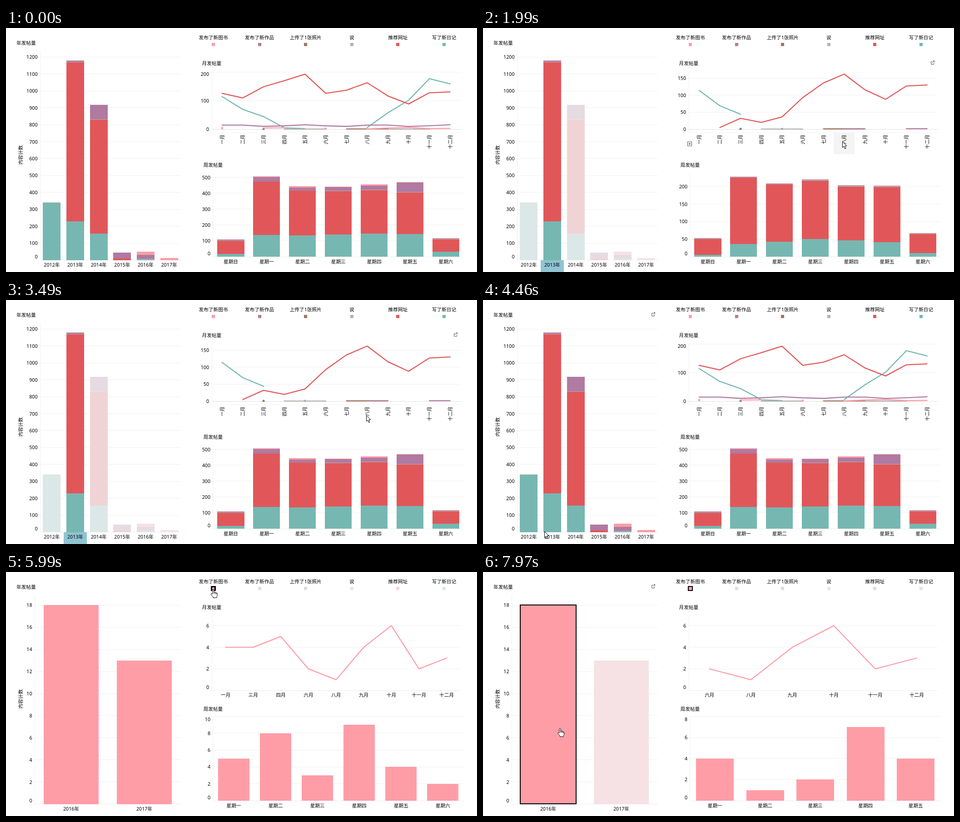
An HTML page for the animation above (8 s loop, 1037 px wide and 540 px high).

```html
<!DOCTYPE html>
<html lang="zh">
<head>
<meta charset="utf-8">
<style>
html, body { margin: 0; width: 100%; height: 100%; overflow: hidden; background: #fff; }
svg { display: block; font: 10.67px "Noto Sans", "Noto Sans CJK SC", "Noto Sans CJK", sans-serif; }
</style>
</head>
<body>
<svg id="stage" width="1037" height="540" viewBox="0 0 1037 540"></svg>
<script>
const stage = document.getElementById('stage');
const LOOP = 8000, PACE = 498, LEAD = 22;

// Series order: diary, link, said, photo, work, book
const COLORS = ['#76b7b2', '#e15759', '#bab0ac', '#9c755f', '#b07aa1', '#ff9da7'];
const BOOK = 5, AUGUST = 7;
const LEGEND = ['发布了新图书', '发布了新作品', '上传了1张照片', '说', '推荐网址', '写了新日记'];
const MONTHS = ['一', '二', '三', '四', '五', '六', '七', '八', '九', '十', '十一', '十二'].map(m => m + '月');
const DAYS = [...'日一二三四五六'].map(d => '星期' + d);

const mix = (diary = 0, link = 0, work = 0, book = 0) => [diary, link, diary ? 2 : 0, 0, work, book];
const bookOnly = n => mix(0, 0, 0, n);
const yearNames = (from, to) => Array.from({ length: to - from + 1 }, (_, i) => from + i + '年');

// Posts per year
const yearBase = { x0: 75, x1: 385, y0: 513.5, top: 50, labelY: 524, tickX: 69.5 };
const yearAll = {
  ...yearBase, k: 0.3742, step: 100, max: 1200, labels: yearNames(2012, 2017),
  data: [mix(338), mix(228, 942, 8), mix(157, 674, 84), mix(0, 9, 36), mix(5, 0, 25, 18), bookOnly(13)]
};
const yearBook = {
  ...yearBase, x0: 63, tickX: 57.5, k: 24.45, step: 2, max: 18,
  labels: yearNames(2016, 2017), data: [18, 13].map(bookOnly)
};
const YEARS = {
  all: yearAll, y13: { ...yearAll, sel: 1, mark: true },
  book: yearBook, book16: { ...yearBook, sel: 0 }
};

// Posts per weekday: totals, with the diary share rising towards midweek
const posts = [108, 507, 445, 441, 455, 470, 116];
const posts13 = [53, 228, 209, 220, 203, 202, 67];
const workDays = [5, 28, 20, 22, 24, 60, 3];
const bookDays = [0, 5, 8, 3, 9, 4, 2];
const midweek = i => Math.sin(Math.PI * i / 7);
function weekday(total, share, work, book = 0) {
  const diary = total * share;
  return mix(diary, total - diary - work - book - 2, work, book);
}
const weekBase = { x0: 455.5, x1: 1008, y0: 506, top: 319.5, labelY: 517, tickX: 450, labels: DAYS };
const WEEKS = {
  all: {
    ...weekBase, k: 0.351, step: 100, max: 500,
    data: posts.map((n, i) => weekday(n, 0.17 + 0.15 * Math.sqrt(midweek(i)), workDays[i], bookDays[i]))
  },
  y13: {
    ...weekBase, k: 0.776, step: 50, max: 200,
    data: posts13.map((n, i) => weekday(n, 0.1 + 0.13 * midweek(i), 1))
  },
  aug: { ...weekBase, k: 5.6, step: 10, max: 30, data: posts13.map(n => mix(0, n * 0.13)) },
  book: {
    ...weekBase, k: 18.66, step: 2, max: 10,
    labels: DAYS.slice(1), data: bookDays.slice(1).map(bookOnly)
  },
  book16: {
    ...weekBase, k: 23.32, step: 2, max: 8,
    labels: DAYS.slice(1, 6), data: [4, 1, 2, 7, 4].map(bookOnly)
  }
};

// Posts per month; empty places break the line
const flat = (v, ...spans) => MONTHS.map((_, i) => spans.some(([a, b]) => i >= a && i <= b) ? v : undefined);
const diary = [114, 69, 44, 5, 2, , , 6, 57, 101, 176, 158];
const link = [125, 109, 148, 169, 192, 125, 136, 162, 116, 88, 127, 130];
const work = MONTHS.map((_, i) => 12.5 + 3 * Math.cos(1.8 * (i - 4)));
const book = [4, , 4, 5, , 2, , 1, 4, 6, 2, 3];
const photo = flat(1, [2, 2], [6, 8]);

const monthBase = { x0: 453, x1: 1000.5, y0: 224, top: 95, bottom: 231.5, labels: MONTHS, tall: true };
const month13 = {
  ...monthBase, k: 0.753, step: 50, max: 150,
  data: [
    [...diary.slice(0, 3), , 1],
    [, 5, 32, 20, 36, 93, ...link.slice(6)],
    flat(0.4, [3, 5]), photo, flat(1.5, [7, 8], [10, 11]), []
  ]
};
function bookMonths(from) {
  const used = MONTHS.map((_, i) => i).filter(i => i >= from && book[i]);
  return {
    ...monthBase, y0: 262.3, bottom: 262.5, tall: false, k: 23.93, step: 2, max: 6,
    labels: used.map(i => MONTHS[i]), data: [[], [], [], [], [], used.map(i => book[i])]
  };
}
const MONTHLY = {
  all: {
    ...monthBase, k: 0.635, step: 100, max: 200,
    data: [diary, link, flat(0.4, [3, 5], [8, 10]), photo, work, book]
  },
  y13: month13, aug: { ...month13, sel: AUGUST },
  book: bookMonths(0), book16: bookMonths(5)
};

// Evenly paced steps; each changes only the listed fields.
const view = name => ({ year: name, month: name, week: name });
const arrow = (x, y) => ({ cursor: ['arrow', x, y] });
const hand = (x, y) => ({ cursor: ['hand', x, y] });
const STEPS = [
  { ...view('all'), swatch: 0, outline: 0 },
  { ...view('y13'), ...arrow(140, 521), icon: 'year', plus: 'year' },
  { ...arrow(812, 254), icon: null, plus: 'month', hover: true },
  { ...arrow(785, 260), icon: 'month' },
  arrow(791, 251),
  { ...arrow(782, 251), month: 'aug', week: 'aug' },
  arrow(793, 255),
  { month: 'y13', week: 'all', plus: null, hover: false },
  { ...arrow(135, 516), icon: 'year', plus: 'year' },
  { ...view('all'), ...arrow(135, 512), plus: null },
  { ...arrow(438, 36), icon: null, swatch: 1 },
  hand(456, 38.5),
  { ...view('book'), swatch: 3 },
  { ...arrow(413, 84), swatch: 2 },
  arrow(469, 278),
  { ...hand(192, 328.5), icon: 'year', outline: 1 },
  { ...view('book16'), ...hand(169.5, 346), outline: 2 }
];

function fade(hex) {
  const part = i => Math.round(parseInt(hex.substr(i, 2), 16) * 0.2 + 195);
  return `rgb(${part(1)},${part(3)},${part(5)})`;
}
const rect = (x, y, w, h, fill, extra = '') =>
  `<rect x="${x}" y="${y}" width="${w}" height="${h}" fill="${fill}" ${extra}/>`;
const framed = (x, y, w, h, fill, stroke) =>
  rect(x, y, w, h, fill, `stroke="#000" stroke-width="${stroke}"`);
const path = (d, stroke, width, extra = 'fill="none"') =>
  `<path d="${d}" stroke="${stroke}" stroke-width="${width}" ${extra}/>`;
const text = (s, x, y, anchor = 'middle', extra = '') =>
  `<text x="${x}" y="${y + 4}" text-anchor="${anchor}" ${extra}>${s}</text>`;
const upright = (s, x, y, anchor) =>
  text(s, 0, 0, anchor, `transform="translate(${x} ${y}) rotate(-90)"`);
const crisp = y => Math.floor(y) + 0.5;

function axis(c, tickX, bottom) {
  let out = path(`M${crisp(c.x0)} ${c.top}V${bottom}`, '#f0f0f0', 1);
  for (let v = 0; v <= c.max; v += c.step) {
    const y = c.y0 - v * c.k;
    const labelY = Math.min(bottom - 7.3, Math.max(c.top + 6.7, y));
    out += path(`M${c.x0} ${crisp(y)}H${c.x1}`, v ? '#f1f1f1' : '#ebebeb', 1);
    out += text(v, tickX, labelY, 'end');
  }
  return out;
}

function barChart(c, outline) {
  const pitch = (c.x1 - c.x0) / c.labels.length;
  const py = v => Math.round(c.y0 - v * c.k);
  let out = axis(c, c.tickX, c.y0);
  c.data.forEach((stack, i) => {
    const mid = c.x0 + pitch * (i + 0.5);
    const left = Math.round(mid - pitch * 0.375), right = Math.round(mid + pitch * 0.375);
    const dim = c.sel !== undefined && c.sel !== i;
    let sum = 0;
    stack.forEach((v, s) => {
      const low = py(sum), high = py(sum += v);
      if (low > high) out += rect(left, high, right - left, low - high, dim ? fade(COLORS[s]) : COLORS[s]);
    });
    if (c.mark && !dim) out += rect(Math.round(mid - pitch / 2), 514, Math.floor(pitch), 26, '#8fc4d3');
    out += text(c.labels[i], mid, c.labelY);
    if (outline && i === 0) {
      const half = outline / 2, top = py(sum) - 1 + half;
      out += framed(left - half, top, right - left + outline, py(0) - half - top, 'none', outline);
    }
  });
  return out;
}

function lineChart(c, hover) {
  const pitch = (c.x1 - c.x0) / c.labels.length;
  const px = i => c.x0 + pitch * (i + 0.5);
  const picked = c.sel !== undefined;
  let out = '';
  if (hover) out += rect(px(AUGUST) - pitch / 2, 232, pitch, 47, picked ? '#8fc4d3' : '#f4f4f4');
  out += axis(c, 447, c.bottom);
  if (c.tall) {
    out += path(`M${c.x0} 224.5H${c.x1}`, '#c8c8c8', 1, 'stroke-dasharray="1 2"');
    out += path(`M${c.x0} 231.5H${c.x1}`, '#f3f3f3', 1);
  }
  c.data.forEach((row, s) => {
    const color = picked ? fade(COLORS[s]) : COLORS[s];
    const has = i => row[i] !== undefined;
    const point = i => `${px(i)} ${c.y0 - row[i] * c.k}`;
    const dot = (i, fill) => path(`M${point(i)}h0`, fill, 5, 'stroke-linecap="round"');
    let d = '';
    c.labels.forEach((_, i) => {
      if (!has(i)) return;
      if (has(i - 1)) d += 'L' + point(i);
      else if (has(i + 1)) d += 'M' + point(i);
      else out += dot(i, color);
    });
    if (d) out += path(d, color, 2.3, 'fill="none" stroke-linejoin="round" stroke-linecap="round"');
    if (picked && has(c.sel)) out += dot(c.sel, COLORS[s]);
  });
  c.labels.forEach((m, i) => {
    out += c.tall ? upright(m, px(i), 236, 'end') : text(m, px(i), 272);
  });
  return out;
}

function legend(swatch) {
  return LEGEND.map((name, i) => {
    const x = 456.5 + i * 101.6;
    const color = COLORS[BOOK - i];
    let out = text(name, x, 21);
    out += rect(Math.round(x - 3.6), 33, 7, 7, swatch > 1 && i ? fade(color) : color);
    if (swatch && !i) {
      const size = (swatch > 1 ? 11 : 7) - swatch;
      out += framed(x - size / 2, 36.5 - size / 2, size, size, color, swatch);
    }
    return out;
  }).join('');
}

const at = (x, y, body) => `<g transform="translate(${x} ${y})">${body}</g>`;
const openIcon = path('M3.5 2H.7V8.4H6.7V5.4M4.6.6H7.5V3.6M7.3.8L3 5.1', '#555', 1);
const plusIcon = rect(.5, .5, 9, 9, '#fff', 'stroke="#555"') + path('M2.5 5H7.5M5 2.5V7.5', '#444', 1);
const CURSORS = {
  arrow: 'M.5.5V13.6L3.5 10.8 5.7 16.2 8 15.2 5.8 10H9.9Z',
  hand: 'M-1.5 10V1.5a1.5 1.5 0 0 1 3 0V7q0-1.3 1.4-1.3t1.4 1.3v.6q0-1 1.3-1t1.3 1.2v.8q0-.9 1.1-.9t1.1 1.3V13q0 2-1.4 3.5V18.5H0V16.5L-4.5 11.5q-.8-1.2.3-2t2.7 1ZM1.5 7v3M4.3 7.6v2.6M6.9 8.6v2'
};

function draw(s) {
  let out = legend(s.swatch);
  out += text('年发帖量', 23, 33, 'start') + text('月发帖量', 431.5, 78, 'start') + text('周发帖量', 434.5, 303, 'start');
  out += upright('内容计数', 32, 281, 'middle');
  out += barChart(YEARS[s.year], s.outline) + lineChart(MONTHLY[s.month], s.hover) + barChart(WEEKS[s.week]);
  if (s.icon) out += s.icon === 'year' ? at(371, 27, openIcon) : at(986, 72, openIcon);
  if (s.plus) out += s.plus === 'year' ? at(73, 523, plusIcon) : at(450, 251.5, plusIcon);
  if (s.cursor) {
    const [kind, x, y] = s.cursor;
    out += at(x, y, path(CURSORS[kind], '#000', 1, 'fill="#fff" stroke-linejoin="round"'));
  }
  stage.innerHTML = out;
}

let shown = -1;
function tick() {
  const t = performance.now() % LOOP;
  const step = Math.min(STEPS.length - 1, Math.floor((t + LEAD) / PACE));
  if (step !== shown) {
    shown = step;
    draw(Object.assign({}, ...STEPS.slice(0, step + 1)));
  }
  requestAnimationFrame(tick);
}
tick();
</script>
</body>
</html>
```
